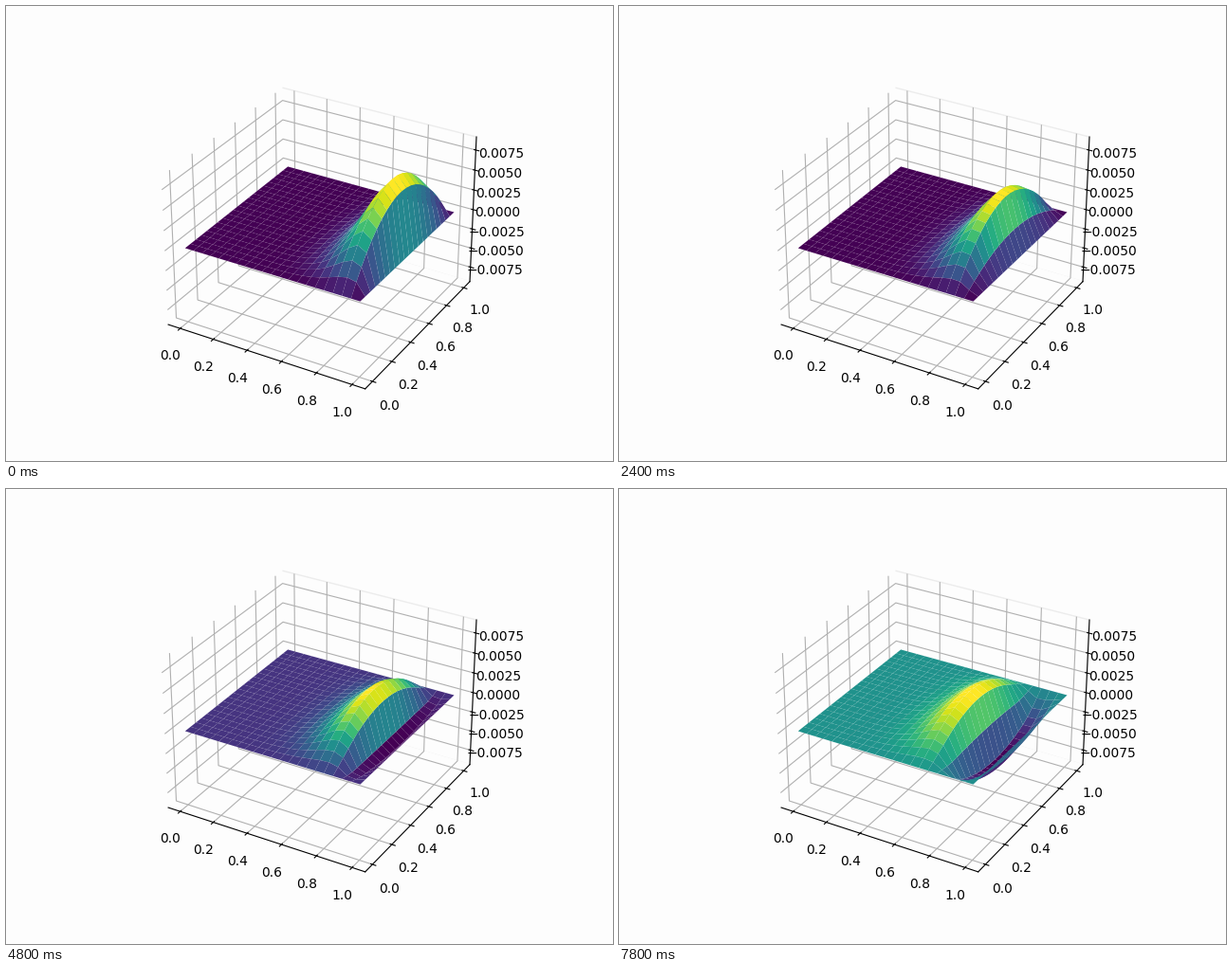
These frames come from a looping animation (640x480 px, 8000 ms). A matplotlib script:

```python
import numpy as np
import matplotlib.pyplot as plt
from matplotlib.animation import FuncAnimation

FRAMES = 40
CELLS = 100           # grid of the solver
STRIDE = 5            # solver cells per drawn cell
STEP = 0.005          # wave speed times time per frame
BACK = "#fdfdfd"

axis = np.linspace(0, 1, CELLS + 1)
X, Y = np.meshgrid(axis, axis)


def laplacian(u):
    """Five-point Laplacian, zero on the fixed rim."""
    out = np.zeros_like(u)
    out[1:-1, 1:-1] = (u[2:, 1:-1] + u[:-2, 1:-1] + u[1:-1, 2:]
                       + u[1:-1, :-2] - 4 * u[1:-1, 1:-1])
    return out * CELLS ** 2


def solve_wave():
    """Membrane let go from a bump close to x = 1."""
    now = X ** 10 * (1 - X) * Y * (1 - Y)
    before = now
    states = []
    for _ in range(FRAMES):
        states.append(now)
        now, before = 2 * now - before + STEP ** 2 * laplacian(now), now
    return states


def coarse(grid):
    return grid[::STRIDE, ::STRIDE]


def padded(low, high, part):
    pad = (high - low) * part
    return low - pad, high + pad


waves = solve_wave()

fig = plt.figure(figsize=(6.4, 4.8), dpi=100, facecolor=BACK)
ax = fig.add_subplot(projection="3d", facecolor=BACK)

side = padded(*padded(0, 1, 0.05), 1 / 48)
ax.set_xlim(*side)
ax.set_ylim(*side)
ax.set_zlim(*padded(-0.00905, 0.00875, 1 / 48))

for item in (ax.xaxis, ax.yaxis, ax.zaxis):
    item.set_pane_color((0.992, 0.992, 0.992, 1))
ax.yaxis.pane.set_edgecolor("#ececec")

surface = None


def draw(i):
    global surface
    if surface is not None:
        surface.remove()
    surface = ax.plot_surface(coarse(X), coarse(Y), coarse(waves[i]),
                              cmap="viridis")
    return [surface]


anim = FuncAnimation(fig, draw, frames=FRAMES, interval=200,
                     repeat=True, repeat_delay=0, blit=False)
plt.show()
```
